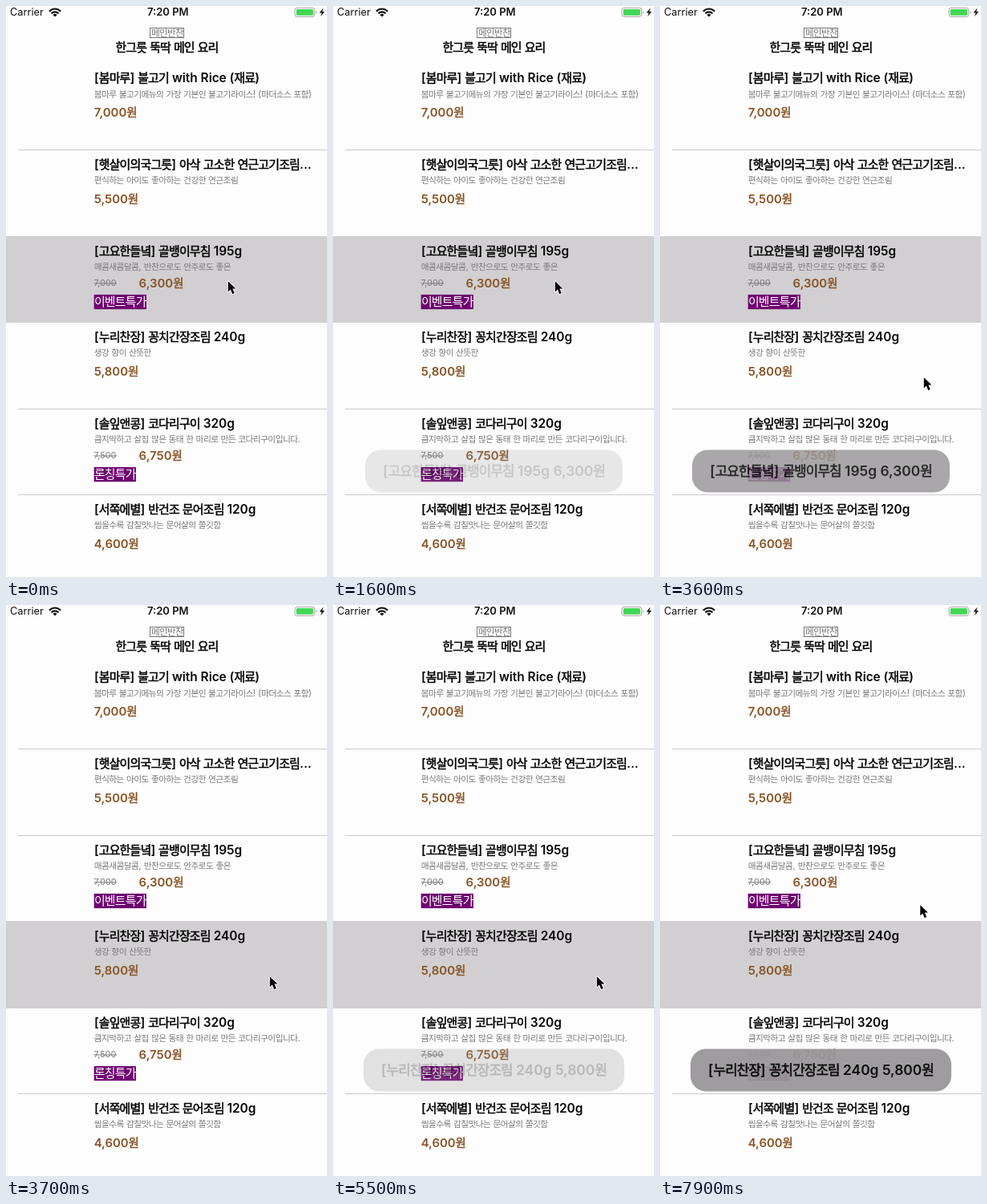
An HTML page for the animation above (8 s loop, 400 by 712 pixels).

```html
<!DOCTYPE html>
<html lang="ko">
<head>
<meta charset="utf-8">
<style>
  html, body { margin: 0; width: 100%; height: 100%; overflow: hidden; background: #fefdfe; }
  svg { display: block; width: 400px; height: 712px; }
  text { font-family: Inter, "Noto Sans CJK KR", "Noto Sans CJK", sans-serif; white-space: pre; fill: currentColor; }
  .ko { font-family: "Noto Sans CJK KR", "Noto Sans CJK", sans-serif; font-size: .97em; letter-spacing: -.053em; }
  .title, .price, .clock, .toast { font-weight: 600; }
  /* semibold Hangul: regular face with a thin outline */
  .title .ko, .price .ko, .toast .ko { font-weight: 400; stroke: currentColor; stroke-width: .036em; }
  .title { font-size: 15.4px; color: #050505; }
  .desc { font-size: 11.05px; color: #79787a; }
  .price { font-size: 14.9px; color: #875424; }
  .old { font-size: 10.8px; color: #79787a; }
  .badge { font-size: 15.4px; color: #fff; }
  .tag { font-size: 11.8px; color: #79787a; }
  .status { font-size: 12.8px; color: #111; }
  .clock { font-size: 13px; color: #111; }
  .toast { font-size: 17.4px; color: #000; }
</style>
</head>
<body>
<svg id="stage" viewBox="0 0 400 712"></svg>
<script>
const LOOP = 8000, STEP = 100, TOP = 72, ROW = 107.55;
const stage = document.getElementById('stage');

const items = [
  { name: '[봄마루] 불고기 with Rice (재료)', desc: '봄마루 불고기메뉴의 가장 기본인 불고기라이스! (마더소스 포함)', price: '7,000원' },
  { name: '[햇살이의국그릇] 아삭 고소한 연근고기조림...', desc: '편식하는 아이도 좋아하는 건강한 연근조림', price: '5,500원' },
  { name: '[고요한들녘] 골뱅이무침 195g', desc: '매콤새콤달콤, 반찬으로도 안주로도 좋은', price: '6,300원', old: '7,000', badge: '이벤트특가' },
  { name: '[누리찬장] 꽁치간장조림 240g', desc: '생강 향이 산뜻한', price: '5,800원' },
  { name: '[솔잎앤콩] 코다리구이 320g', desc: '큼지막하고 살집 많은 동태 한 마리로 만든 코다리구이입니다.', price: '6,750원', old: '7,500', badge: '론칭특가' },
  { name: '[서쪽에별] 반건조 문어조림 120g', desc: '씹을수록 감칠맛나는 문어살의 쫄깃함', price: '4,600원' }
];

function add(tag, attrs, parent = stage) {
  const el = document.createElementNS('http://www.w3.org/2000/svg', tag);
  for (const key in attrs) el.setAttribute(key, attrs[key]);
  parent.appendChild(el);
  return el;
}

// Hangul runs get their own face and spacing
function write(str, x, y, cls, anchor = 'start', parent = stage) {
  const el = add('text', { x, y, class: cls, 'text-anchor': anchor }, parent);
  for (const run of str.match(/[가-힣]+|[^가-힣]+/g)) {
    if (/[가-힣]/.test(run)) add('tspan', { class: 'ko' }, el).textContent = run;
    else el.append(run);
  }
}

function drawStatus() {
  write('Carrier', 4.9, 12.4, 'status');
  const arcs = add('g', { fill: 'none', stroke: '#111', 'stroke-width': 2.1 });
  add('path', { d: 'M53.8 6.6Q61 0.4 68.2 6.6M56.4 9.3Q61 5.4 65.6 9.3' }, arcs);
  add('path', { d: 'M58.4 10.9Q61 8.8 63.6 10.9L61 13.5Z', fill: '#111' });
  write('7:20 PM', 201.8, 12.4, 'clock', 'middle');
  add('rect', { x: 360, y: 2.4, width: 24.6, height: 11, rx: 2.8, fill: 'none', stroke: '#9a9a9a', 'stroke-width': .9 });
  add('rect', { x: 361.7, y: 4, width: 21.2, height: 7.8, rx: 1.5, fill: '#43d656' });
  add('path', { d: 'M386 6Q388 7.9 386 9.8Z', fill: '#9a9a9a' });
  add('path', { d: 'M395.4 2.6L390.6 8.6H393.4L392.2 13L397 6.9H394.2Z', fill: '#111' });
}

function drawHeader() {
  add('rect', { x: 179.5, y: 27.5, width: 42, height: 12, fill: 'none', stroke: '#79787a' });
  write('메인반찬', 201, 37.6, 'tag', 'middle');
  write('한그릇 뚝딱 메인 요리', 200.5, 57.3, 'title', 'middle');
}

function drawItem(item, i) {
  const y = TOP + i * ROW;
  write(item.name, 110, y + 23.4, 'title');
  write(item.desc, 109.7, y + 41.5, 'desc');
  if (!item.old) return write(item.price, 109.7, y + 66.4, 'price');
  write(item.old, 109.5, y + 62.2, 'old');
  add('path', { d: `M109.5 ${y + 58.8}H138`, stroke: '#79787a', 'stroke-width': 1 });
  write(item.price, 165.6, y + 64.1, 'price');
  add('rect', { x: 109.7, y: y + 72.8, width: item.badge.length * 13.05, height: 18.2, fill: '#6e0070' });
  write(item.badge, 109.9, y + 87.1, 'badge');
}

function makeToast(i, width) {
  const g = add('g', { opacity: 0 });
  add('rect', { x: 200.5 - width / 2, y: 553.5, width, height: 53, rx: 19.3, fill: '#999799' }, g);
  write(items[i].name + ' ' + items[i].price, 200.5, 585.8, 'toast', 'middle', g);
  return g;
}

// Row edges sit on whole pixels
const rowEdge = i => Math.round(TOP - .55 + i * ROW);

for (let i = 1; i < items.length; i++)
  add('rect', { x: 15, y: rowEdge(i), width: 385, height: 1, fill: '#cbc9cc' });
const highlight = add('rect', { x: 0, width: 400, fill: '#d1cfd1' });
drawStatus();
drawHeader();
items.forEach(drawItem);

// Each tap selects a row and starts a five second fade
const taps = [
  { at: 0, row: 2, toast: makeToast(2, 321) },
  { at: 3700, row: 3, toast: makeToast(3, 325) }
];
const FADE = 5000;

const cursor = add('path', {
  d: 'M0 0V13.3L3 10.4L5.4 16L7.9 14.9L5.6 9.4H9.7Z',
  fill: '#000', stroke: '#fff', 'stroke-width': 2, 'stroke-linejoin': 'round', 'paint-order': 'stroke'
});

// time, x, y
const path = [
  [0, 276.8, 343.2], [2700, 276.8, 343.2], [3400, 328.8, 463.2], [7200, 328.8, 463.2],
  [7450, 344, 598], [7800, 324.3, 374.2], [LOOP, 324.3, 374.2]
];

const smooth = p => p * p * (3 - 2 * p);
const clamp = p => Math.min(1, Math.max(0, p));

// cubic-bezier(.42, 0, .58, 1)
function easeInOut(p) {
  let lo = 0, hi = 1;
  for (let n = 0; n < 20; n++) {
    const u = (lo + hi) / 2, v = 1 - u;
    if (3 * v * v * u * .42 + 3 * v * u * u * .58 + u * u * u < p) lo = u; else hi = u;
  }
  return smooth(lo);
}

function render(t) {
  const current = t < taps[1].at ? taps[0] : taps[1];
  const top = rowEdge(current.row);
  highlight.setAttribute('y', top);
  highlight.setAttribute('height', rowEdge(current.row + 1) + 1 - top);
  for (const tap of taps)
    tap.toast.setAttribute('opacity', tap === current ? easeInOut(clamp((t - tap.at) / FADE)) : 0);

  const k = path.findIndex(p => p[0] > t);
  const [t0, x0, y0] = path[k - 1], [t1, x1, y1] = path[k];
  const p = smooth((t - t0) / (t1 - t0));
  cursor.setAttribute('transform', `translate(${x0 + (x1 - x0) * p} ${y0 + (y1 - y0) * p})`);
}

const start = performance.now();
function tick() {
  const t = (performance.now() - start) % LOOP;
  render(Math.floor(t / STEP) * STEP);
  requestAnimationFrame(tick);
}
tick();
</script>
</body>
</html>
```
